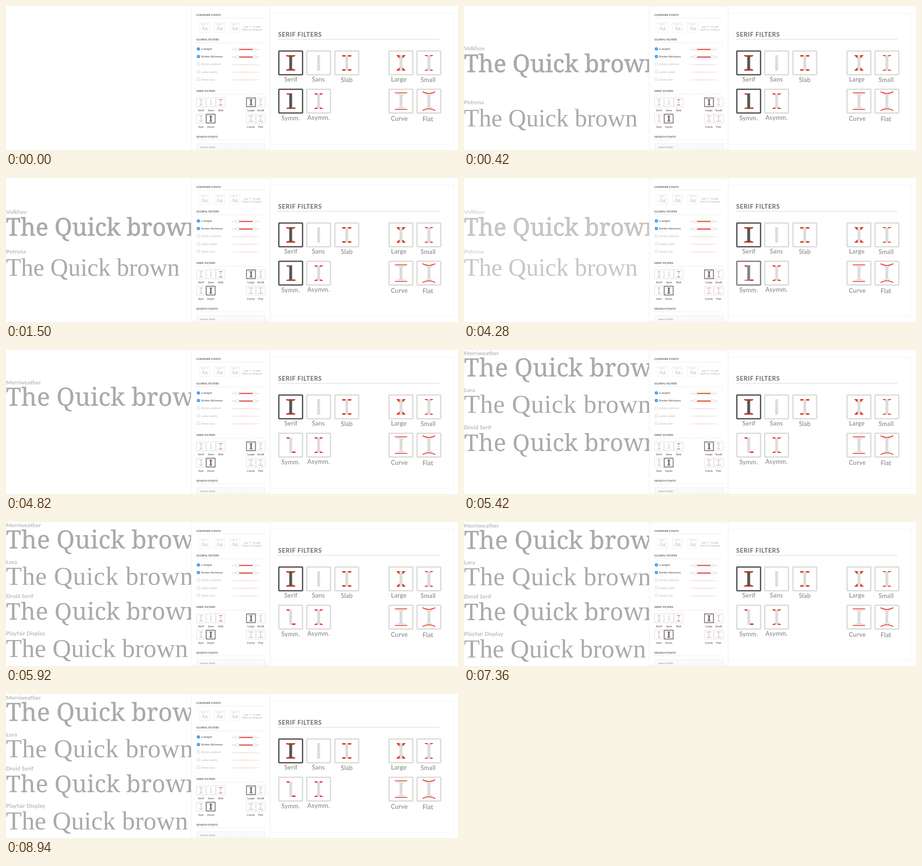
An HTML page with a canvas for the animation above (9020 ms loop, 955 px wide and 305 px high).

```html
<!DOCTYPE html>
<html lang="en">
<head>
<meta charset="utf-8">
<title>Serif filters</title>
<style>
html, body { margin: 0; width: 100%; height: 100%; overflow: hidden; background: #fff; }
canvas { display: block; width: 955px; height: 305px; }
</style>
</head>
<body>
<canvas id="stage"></canvas>
<script>
const W = 955, H = 305, LOOP = 9020;
const RED = '#e8301c', DARK = '#555', PALE = '#dcdcdc';
const LATO = 'Lato, sans-serif';
const NOTO = '"Noto Serif", serif';
const LIBERATION = '"Liberation Serif", serif';

const canvas = document.getElementById('stage');
const ratio = window.devicePixelRatio || 1;
canvas.width = W * ratio;
canvas.height = H * ratio;
const ctx = canvas.getContext('2d');
ctx.scale(ratio, ratio);

// Type samples: label baseline, sample baseline, start time
const firstSet = [
  { name: 'Volkhov', label: 76, base: 122, font: '50.2px ' + NOTO, bold: 0.8, start: 20 },
  { name: 'Petrona', label: 160, base: 207, font: '52px ' + LIBERATION, start: 135 }
];
const secondSet = [
  { name: 'Merriweather', label: 12, base: 57, font: '52.2px ' + NOTO, bold: 0.3 },
  { name: 'Lora', label: 90, base: 134, font: '54.5px ' + LIBERATION, spacing: 0.75 },
  { name: 'Droid Serif', label: 162, base: 208, font: '50px ' + NOTO },
  { name: 'Playfair Display', label: 241, base: 287, font: '54.5px ' + LIBERATION }
];
secondSet.forEach((s, i) => { s.start = 4650 + i * 235; });

const clamp = x => Math.max(0, Math.min(1, x));
const rest = (t, start, span) => Math.pow(1 - clamp((t - start) / span), 3);

function mix(a, b, k) {
  const v = Math.round(a + (b - a) * k);
  return `rgb(${v},${v},${v})`;
}

function text(str, x, y, font, color, align = 'left', spacing = 0) {
  ctx.font = font;
  ctx.fillStyle = color;
  ctx.textAlign = align;
  ctx.letterSpacing = spacing + 'px';
  ctx.fillText(str, x, y);
}

function line(points, color, width = 1, dash = []) {
  ctx.beginPath();
  points.forEach(([x, y], i) => i ? ctx.lineTo(x, y) : ctx.moveTo(x, y));
  ctx.strokeStyle = color;
  ctx.lineWidth = width;
  ctx.setLineDash(dash);
  ctx.stroke();
  ctx.setLineDash([]);
}

function rect(x, y, w, h, color) {
  ctx.fillStyle = color;
  ctx.fillRect(x, y, w, h);
}

function frame(x, y, w, h, color, width = 1, radius = 0, dash = []) {
  ctx.beginPath();
  ctx.roundRect(x + width / 2, y + width / 2, w - width, h - width, radius);
  ctx.strokeStyle = color;
  ctx.lineWidth = width;
  ctx.setLineDash(dash);
  ctx.stroke();
  ctx.setLineDash([]);
}

function disc(x, y, r, fill, stroke) {
  ctx.beginPath();
  ctx.arc(x, y, r, 0, Math.PI * 2);
  ctx.fillStyle = fill;
  ctx.fill();
  ctx.strokeStyle = stroke;
  ctx.lineWidth = 0.8;
  ctx.stroke();
}

function drawSample(s, dy) {
  text(s.name, 0, s.label + dy, 'bold 12px ' + LATO, '#bcbcbc');
  text('The Quick brown', 0, s.base + dy, s.font, '#aaa', 'left', s.spacing);
  if (s.bold) {
    ctx.strokeStyle = '#aaa';
    ctx.lineWidth = s.bold;
    ctx.strokeText('The Quick brown', 0, s.base + dy);
  }
}

function drawSamples(t) {
  if (t < 4440) {
    ctx.globalAlpha = 1 - clamp((t - 4200) / 240);
    for (const s of firstSet) {
      if (t >= s.start) drawSample(s, 234 * rest(t, s.start, 700));
    }
    ctx.globalAlpha = 1;
    return;
  }
  // Rows land slightly high, then sink into place
  const drift = -1.7 * (1 - clamp((t - 5060) / 1340));
  for (const s of secondSet) {
    if (t >= s.start) drawSample(s, 300 * rest(t, s.start, 420) + drift);
  }
}

// One serif beside the stem; sx and sy pick the corner
function wedge(cx, cy, sx, sy, w, inner, outer) {
  const x = cx + sx * 3, y = cy + sy * 16.5;
  ctx.beginPath();
  ctx.moveTo(x, y);
  ctx.lineTo(x + sx * w, y);
  ctx.lineTo(x + sx * w, y - sy * outer);
  ctx.lineTo(x, y - sy * inner);
  ctx.fillStyle = RED;
  ctx.fill();
}

function corners(cx, cy, w, inner, outer) {
  for (const sx of [-1, 1]) for (const sy of [-1, 1]) wedge(cx, cy, sx, sy, w, inner, outer);
}

function greyBars(cx, cy, dy) {
  for (const s of [-1, 1]) rect(cx - 8, cy + s * dy - 1, 16, 2, PALE);
}

function arc(cx, y, bend) {
  ctx.beginPath();
  ctx.moveTo(cx - 13.5, y);
  ctx.quadraticCurveTo(cx, y + bend, cx + 13.5, y);
  ctx.strokeStyle = RED;
  ctx.lineWidth = 1.6;
  ctx.stroke();
}

const glyphs = {
  Serif: (x, y) => corners(x, y, 6.5, 4.5, 2.2),
  Sans() {},
  Slab: (x, y) => corners(x, y, 6.5, 3.2, 3.2),
  Large: (x, y) => corners(x, y, 6.5, 7, 0.8),
  Small: (x, y) => corners(x, y, 6, 3, 1),
  'Symm.'(x, y, on) {
    wedge(x, y, -1, -1, 6, 3.5, 2);
    wedge(x, y, 1, 1, 7, 3.2, 3.2);
    ctx.globalAlpha = on;
    wedge(x, y, -1, 1, 6, 3.5, 2);
    ctx.globalAlpha = 1;
  },
  'Asymm.': (x, y) => corners(x, y, 6, 3.8, 1.2),
  Curve(x, y) {
    greyBars(x, y, 14);
    for (const s of [-1, 1]) line([[x - 13, y + s * 17.5], [x + 13, y + s * 17.5]], RED, 1.6);
  },
  Flat(x, y) {
    greyBars(x, y, 14);
    arc(x, y - 20, 7.5);
    arc(x, y + 20, -7.5);
  }
};

// name, box left, box top, label centre, label baseline
const bigIcons = [
  ['Serif', 575, 94, 602, 160], ['Sans', 634, 94, 660, 160], ['Slab', 693.5, 94, 720, 161],
  ['Large', 808, 94, 830, 160], ['Small', 867, 94, 892, 161],
  ['Symm.', 575, 175, 601.5, 242], ['Asymm.', 634, 175, 660.5, 241],
  ['Curve', 808, 175, 831, 242.5], ['Flat', 867, 175, 891.5, 243.5]
];

function drawBigIcon([name, x, y, lx, ly], on) {
  const cx = x + 26.5, cy = y + 26.5;
  frame(x, y, 53, 53, mix(220, 85, on), 2.8, 1);
  const stem = name === 'Curve' || name === 'Flat' ? 28 : 33;
  rect(cx - 3, cy - stem / 2, 6, stem, mix(220, 85, on));
  glyphs[name](cx, cy, on);
  text(name, lx, ly, '13px ' + LATO, '#7c7c7c', 'center', 0.35);
}

function drawRightPanel(t) {
  frame(557.5, 14.5, 389, 279, '#e6e6e6', 1, 0, [1, 1]);
  text('SERIF FILTERS', 575, 65, 'bold 13px ' + LATO, '#6c6c6c', 'left', 0.58);
  line([[574, 70.5], [916, 70.5]], '#d6d6d6');
  const symm = 1 - clamp((t - 4200) / 240);
  for (const icon of bigIcons) {
    drawBigIcon(icon, icon[0] === 'Serif' ? 1 : icon[0] === 'Symm.' ? symm : 0);
  }
}

// name, box left, box top, selected
const smallIcons = [
  ['Serif', 402, 194], ['Sans', 423, 194], ['Slab', 443.5, 194],
  ['Large', 507.5, 194, true], ['Small', 528, 194],
  ['Sym', 402, 228.5], ['Asym', 422.5, 228.5, true],
  ['Curve', 507.5, 228.5], ['Flat', 528, 228.5]
];

function drawSmallIcon([name, x, y, on]) {
  const cx = x + 10, cy = y + 10;
  frame(x, y, 20, 20, on ? '#5c5c5c' : '#dedede', on ? 1.4 : 1);
  const plain = name === 'Sans';
  rect(cx - 1, cy - 6, on ? 2.6 : 2, 12, on ? DARK : '#d6d6d6');
  if (!plain) {
    const bar = on ? '#8d4a48' : name === 'Slab' ? '#e0523f' : '#eba79e';
    for (const s of [-1, 1]) {
      const wide = name === 'Curve' || name === 'Flat' ? 5 : 3.6;
      rect(cx - wide, cy + s * 5.7 - 0.6, wide * 2, 1.2, bar);
    }
  }
  text(name, cx, y + 29.3, 'bold 6.2px ' + LATO, '#6c6c6c', 'center');
}

function heading(str, y) {
  text(str, 402, y, '900 6.1px ' + LATO, '#777');
  line([[402, y + 4.5], [548, y + 4.5]], '#ddd', 1, [1, 1]);
}

function drawSlider(label, y, on) {
  ctx.beginPath();
  ctx.roundRect(403.8, y - 2.7, 5.4, 5.4, 1.2);
  ctx.fillStyle = on ? '#1e8cf0' : '#fff';
  ctx.fill();
  ctx.strokeStyle = on ? '#1e8cf0' : '#c4c4c4';
  ctx.lineWidth = 0.8;
  ctx.stroke();
  text(label, 412, y + 2.2, 'bold 6.3px ' + LATO, on ? '#6c6c6c' : '#c6c6c6');
  if (on) {
    line([[405, y], [406.2, y + 1.3], [408.2, y - 1.4]], '#fff', 0.9);
    line([[476, y + 1], [535, y + 1]], '#ddd', 1.6);
    line([[489, y + 1], [524, y + 1]], '#e5584a', 2.6);
    disc(489, y + 1, 3.4, '#fff', '#d2d2d2');
    disc(524.5, y + 1, 3.4, '#fff', '#d2d2d2');
  } else {
    const fade = ctx.createLinearGradient(476, 0, 535, 0);
    fade.addColorStop(0, '#f3efee');
    fade.addColorStop(0.5, '#f6d9d4');
    fade.addColorStop(1, '#f3efee');
    line([[476, y + 1], [535, y + 1]], fade, 2);
  }
}

function drawMiddlePanel() {
  rect(391, 0, 167, H, '#fff');
  frame(391, 0, 167.5, 304, '#dedede', 1, 0, [1, 1]);

  heading('COMPARE FONTS', 21);
  [408, 440, 472].forEach((x, i) => {
    frame(x, 35, 22, 22, '#dedede', 1, 0, [1, 1]);
    text('FONT ' + (i + 1), x + 11, 40, '3.8px ' + LATO, '#bbb', 'center');
    text('Aa', x + 11, 51, '11.5px ' + LIBERATION, '#b4b4b4', 'center');
  });
  text('Use "+" to edit', 520, 45.5, 'bold 5.5px ' + LATO, '#c0c0c0', 'center');
  text('fonts to compare', 520, 52, 'bold 5.5px ' + LATO, '#c0c0c0', 'center');

  heading('GLOBAL FILTERS', 73.3);
  ['x-height', 'Stroke thickness', 'Stroke contrast', 'Letter width', 'Stress Axe']
    .forEach((label, i) => drawSlider(label, 91 + i * 16.1, i < 2));

  heading('SERIF FILTERS', 182.4);
  smallIcons.forEach(drawSmallIcon);

  heading('SEARCH FONTS', 278.8);
  rect(403, 291, 145, 12, '#fafafa');
  frame(403, 291, 145, 16, '#e0e0e0', 1, 0, [1, 1]);
  text('search fonts', 410, 301, 'bold 5.9px ' + LATO, '#a8a8a8');
  for (let x = 455; x < 545; x += 18) frame(x, 295, 9, 8, '#f0f0f0', 1, 0, [1, 1]);
}

function draw() {
  const t = performance.now() % LOOP;
  rect(0, 0, W, H, '#fff');
  drawSamples(t);
  drawMiddlePanel();
  drawRightPanel(t);
  requestAnimationFrame(draw);
}
draw();
</script>
</body>
</html>
```
